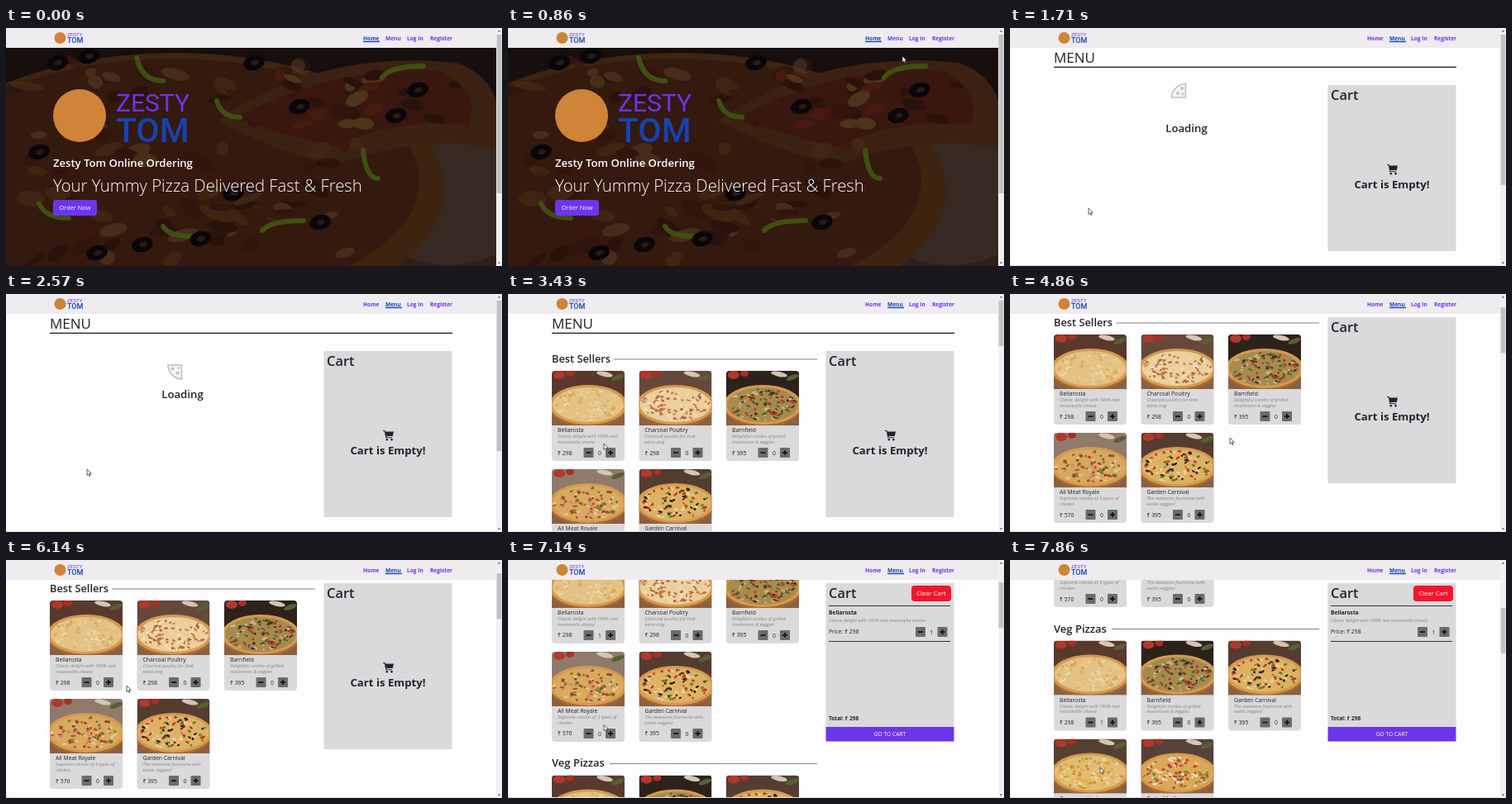
An HTML page for the animation above (8 s loop, 600 by 288 pixels).

```html
<!DOCTYPE html>
<html lang="en">
<head>
<meta charset="utf-8">
<title>Online ordering</title>
<style>
  html, body { margin: 0; width: 100%; height: 100%; overflow: hidden; background: #fdfcfe; }
  svg { display: block; width: 600px; height: 288px; font-family: "Open Sans", "Noto Sans", sans-serif; fill: #212529; }
  .brand { font-family: Roboto, "Open Sans", sans-serif; }
  .semi { font-weight: 600; }
  .bold { font-weight: 700; }
  .note { font-style: italic; fill: #858388; }
  .mid { text-anchor: middle; }
  .white { fill: #fff; }
</style>
</head>
<body>
<svg id="stage" viewBox="0 0 600 288"></svg>
<script>
const PURPLE = '#6c35ec', BLUE = '#1747b5', PANEL = '#dad9db';
const TICK = 1000 / 7, TICKS = 56;
const PAGE_OPENS = 9, MENU_LOADED = 20, ITEM_ADDED = 45;

let seed = 1;
function random() {
  seed = (seed * 16807) % 2147483647;
  return seed / 2147483647;
}
const between = (a, b) => a + (b - a) * random();
const pick = list => list[Math.floor(random() * list.length)];

const text = (x, y, size, str, cls = '', attrs = '') =>
  `<text x="${x}" y="${y}" font-size="${size}" class="${cls}" ${attrs}>${str}</text>`;
const rect = (x, y, w, h, fill, r = 0) =>
  `<rect x="${x}" y="${y}" width="${w}" height="${h}" rx="${r}" fill="${fill}"/>`;
const oval = (x, y, rx, ry, fill, angle = 0) =>
  `<ellipse cx="${x}" cy="${y}" rx="${rx}" ry="${ry}" fill="${fill}" transform="rotate(${angle} ${x} ${y})"/>`;
const group = (id, body, attrs = '') => `<g id="${id}" ${attrs}>${body}</g>`;
const repeat = (n, make) => Array.from({ length: n }, (_, i) => make(i)).join('');

// Dishes: name, two lines of description, price, backdrop, cheese, toppings
const dishes = {
  plain: ['Bellarosta', 'Classic delight with 100% real', 'mozzarella cheese', 298,
    '#59392c', '#e3c283', ['#edd7a5', '#d9ac62', '#e9cb8c']],
  smoky: ['Charcoal Poultry', 'Charcoal poultry for that', 'extra zing', 298,
    '#66483b', '#ebcf9c', ['#b5623a', '#c47747', '#f0dfba']],
  barn: ['Barnfield', 'Delightful combo of grilled', 'mushroom &amp; veggies', 395,
    '#2d211b', '#a98a4b', ['#c52f2b', '#4d6a22', '#665038', '#3b2f20', '#cdb694']],
  meat: ['All Meat Royale', 'Supreme combo of 3 types of', 'chicken', 570,
    '#907a6c', '#d9a95f', ['#b9422f', '#d98270', '#8c4a2c', '#66792d', '#e7c890']],
  garden: ['Garden Carnival', 'The awesome foursome with', 'exotic veggies!', 395,
    '#543c30', '#ddb265', ['#c93125', '#2b241f', '#64842d', '#ebcf91']],
  corn: ['Creamy n Husk', 'Sweet &amp; juicy golden', 'corn', 375,
    '#55402f', '#e2bd76', ['#e3aa2f', '#efd79e', '#c99336']],
  perky: ['Perky Medley', 'Flavorful trio of juicy', 'veggies', 395,
    '#564234', '#dba85a', ['#cb3a2b', '#f0dfc0', '#6d8a33']],
};

function dishPhoto([, , , , backdrop, cheese, toppings]) {
  const topping = () => {
    const r = Math.sqrt(random()), a = between(0, 2 * Math.PI);
    return oval(44 + 41 * r * Math.cos(a), 41 + 19 * r * Math.sin(a),
      between(1.3, 3), between(.8, 1.7), pick(toppings), between(-40, 40));
  };
  return rect(0, 0, 88, 66, backdrop) + rect(0, 52, 88, 14, '#896044') +
    oval(9, 5, 7, 5, '#b3372a') + oval(22, 3, 5, 4, '#a82f25') +
    oval(64, 4, 10, 3, '#d3c5b1', 12) + oval(80, 8, 8, 3, '#566034', -20) +
    oval(44, 43, 48, 25, '#a8672f') + oval(44, 41, 47, 24, '#d39b51') +
    oval(44, 41, 43, 21, cheese) + repeat(95, topping);
}

const stepper = (x, y, qty, cls = '') =>
  rect(x, y, 12, 12, '#6d6b6d', 1) + rect(x + 3, y + 5.2, 6, 1.7, '#111') +
  text(x + 19.5, y + 8.6, 6.8, qty, 'mid ' + cls) +
  rect(x + 26.5, y, 12, 12, '#6d6b6d', 1) + rect(x + 29.5, y + 5.2, 6, 1.7, '#111') +
  rect(x + 31.7, y + 3, 1.7, 6, '#111');

function card(key, column, y) {
  const [name, line1, line2, price] = dishes[key];
  return `<g transform="translate(${53 + 105.5 * column} ${y})">` + rect(0, 0, 88, 109, PANEL, 4) +
    `<use href="#photo-${key}"/>` + text(7, 74, 6.8, name) +
    text(7, 81.3, 5.6, line1, 'note') + text(7, 87.6, 5.6, line2, 'note') +
    text(7, 101.5, 6.8, '₹ ' + price) +
    stepper(38.5, 93, 0, key === 'plain' ? 'chosen-qty' : '') + '</g>';
}

const section = (title, lineX, y, size, rows) =>
  text(53, y, size, title, 'semi') + rect(lineX, y - 4.5, 374 - lineX, 1, '#858385') +
  rows.map((row, r) => row.map((key, c) => card(key, c, y + 10 + 119 * r)).join('')).join('');

function heroPhoto() {
  const pepper = (x, y, dx, dy) =>
    `<path d="M${x} ${y}q${dx * .2} ${dy} ${dx} ${dy}" fill="none" stroke="#4c6414" stroke-width="6" stroke-linecap="round"/>`;
  const olive = ([x, y]) => oval(x, y, 13, 9, '#0b090b', -15) + oval(x + 1, y, 5, 3, '#33201a', -15);
  const crumb = () => oval(between(10, 430), between(40, 285), between(6, 22), between(4, 10),
    pick(['#4b1d12', '#57351b', '#3b1a11', '#62432a', '#2e160f']), between(-40, 40));
  return rect(0, 24, 593, 264, '#1d1311') +
    oval(540, 205, 125, 105, '#35281f') + oval(535, 195, 112, 92, '#43342a') +
    oval(205, 195, 325, 165, '#4c2d15') + oval(200, 185, 300, 148, '#412012') +
    `<path d="M255 112Q380 25 545 42Q610 65 593 145Q500 128 400 165Q325 150 255 112Z" fill="#4a2a16"/>
     <path d="M275 110Q395 45 525 52Q575 75 560 118Q470 108 395 145Z" fill="#481d13"/>` +
    `<g opacity=".7">${repeat(90, crumb)}</g>` +
    repeat(22, () => oval(between(320, 560), between(55, 120), between(6, 16), between(4, 8),
      pick(['#572013', '#60401f', '#35170f']), between(-30, 30))) +
    pepper(158, 36, 32, 28) + pepper(255, 88, 28, 20) + pepper(455, 60, 50, -14) +
    pepper(432, 148, 18, 34) + pepper(310, 245, 50, -12) + pepper(190, 240, 34, 12) + pepper(40, 212, 36, 18) +
    [[62, 42], [100, 34], [300, 42], [355, 95], [472, 106], [498, 75], [275, 200],
     [380, 235], [235, 255], [165, 262], [40, 150], [110, 272]].map(olive).join('') +
    rect(0, 24, 593, 264, 'rgba(0,0,0,.2)');
}

const hero = heroPhoto() + oval(89, 106, 32, 32, '#cf8437') +
  text(133, 101, 30, 'ZESTY', 'brand', `style="fill:${PURPLE}"`) +
  text(133, 138, 41, 'TOM', 'brand', 'style="fill:#1642b0;font-weight:500"') +
  text(57, 168, 13.1, 'Zesty Tom Online Ordering', 'semi white') +
  text(57, 198, 20.3, 'Your Yummy Pizza Delivered Fast &amp; Fresh', 'white', 'font-weight="300"') +
  rect(57, 208, 53, 19, PURPLE, 3) + text(83.5, 220.3, 7.4, 'Order Now', 'mid white');

const loading =
  group('slice', `<path d="M212.5 84H195.5A17.5 17 0 0 1 212.5 67.5Z" fill="#f4f3f5" stroke="#c2c0c3" stroke-width="1.6"/>` +
    oval(208, 73, 2, 2, '#c2c0c3') + oval(203, 79, 2, 2, '#c2c0c3') + oval(209, 80, 1.4, 1.4, '#c2c0c3')) +
  text(213.5, 125.5, 13.2, 'Loading', 'semi mid');

const list =
  section('Best Sellers', 128, 83, 12.8, [['plain', 'smoky', 'barn'], ['meat', 'garden']]) +
  section('Veg Pizzas', 123, 351.5, 13, [['plain', 'barn', 'garden'], ['corn', 'perky']]);

const emptyCart = rect(0, 0, 155, 201, PANEL) +
  `<path transform="translate(71.5 96)" d="M0 0h2.6l.4 1.5H13l-1.2 5.4H4.2l.3 1.3h6.8v1.1H3.4L1.8 1.1H0z"/>` +
  oval(76.3, 107.2, 1.3, 1.3, '#212529') + oval(82, 107.2, 1.3, 1.3, '#212529') +
  text(77.5, 125, 13.2, 'Cart is Empty!', 'bold mid');

const filledCart = rect(0, 0, 155, 175, PANEL) +
  rect(103.5, 3, 48, 19, '#f3152d', 4) + text(127.5, 15.4, 7.7, 'Clear Cart', 'mid white') +
  rect(3.5, 27, 147, 1, '#333') + text(3.5, 38.3, 6.7, dishes.plain[0], 'bold') +
  text(3.5, 47, 5.5, dishes.plain[1] + ' ' + dishes.plain[2], 'note') +
  text(3.5, 61.4, 6.8, 'Price: ₹ 298') + stepper(108.5, 53, 1) +
  rect(3.5, 70, 147, 1, '#333') + text(3.5, 165.8, 6.5, 'Total: ₹ 298', 'bold') +
  rect(0, 174, 155, 17.5, PURPLE) + text(77.5, 185.3, 6.7, 'GO TO CART', 'mid white');

const navLink = (label, x) => text(x, 14.5, 6.6, label, 'bold', `id="link-${label}" style="fill:${PURPLE}"`);
const nav = rect(0, 0, 593, 24, '#eeecef') + oval(65.5, 12, 7, 7, '#cf8437') +
  text(74, 10.3, 6.2, 'ZESTY', 'brand', `style="fill:${PURPLE}"`) +
  text(74, 18.4, 9, 'TOM', 'brand', 'style="fill:#1642b0;font-weight:500"') +
  navLink('Home', 432) + navLink('Menu', 459) + navLink('Log In', 485) + navLink('Register', 513) +
  `<rect id="underline" y="15.8" width="20" height="1.4" fill="${BLUE}"/>`;

const scrollbar = rect(593, 0, 7, 288, '#f1f0f2') +
  '<path d="M594.8 4.5l1.7-2 1.7 2zM594.8 283.5l1.7 2 1.7-2z" fill="#555"/>' +
  '<rect id="thumb" x="593.7" width="5.6" fill="#c2c1c3"/>';

const photos = Object.entries(dishes).map(([key, dish]) =>
  `<g id="photo-${key}" clip-path="url(#frame)">${dishPhoto(dish)}</g>`).join('');

const $ = id => document.getElementById(id);
$('stage').innerHTML =
  `<defs><clipPath id="frame"><path d="M0 66V4Q0 0 4 0H84Q88 0 88 4V66Z"/></clipPath>${photos}</defs>` +
  rect(0, 0, 600, 288, '#fdfcfe') + group('hero', hero) +
  group('menu',
    group('page', text(53, 42, 17, 'MENU') + rect(53, 46.7, 487, 1.4, '#212529') +
      group('loading', loading) + group('list', list)) +
    group('cart', group('empty', emptyCart) + group('filled', filledCart) + text(3.5, 17.5, 16.4, 'Cart', 'semi')) +
    rect(0, 287, 593, 1, '#dddbde')) +
  nav + scrollbar +
  group('cursor', '<path d="M0 0V7.4L1.7 5.9 2.9 8.5 4 8 2.9 5.4H5.2Z" fill="#fff" stroke="#222" stroke-width=".7"/>');

// Keyframes: [tick, ...values], eased from each to the next
const pointerKeys = [[3, 505, 92], [6, 477, 34], [8, 469, 13], [9, 468, 13], [12, 95, 218], [18, 98, 212],
  [24, 116, 181], [26, 122, 180], [32, 266, 174], [35, 266, 174], [43, 146, 152], [45, 124, 147],
  [48, 123, 148], [52, 109, 251], [56, 109, 251]];
const scrollKeys = [[31, 0], [33, 44], [48, 44], [54, 264]];

function track(keys, tick) {
  const next = keys.findIndex(key => key[0] > tick);
  if (next === 0) return keys[0].slice(1);
  if (next < 0) return keys[keys.length - 1].slice(1);
  const a = keys[next - 1], b = keys[next];
  const p = (tick - a[0]) / (b[0] - a[0]), eased = p * p * (3 - 2 * p);
  return a.slice(1).map((value, i) => value + (b[i + 1] - value) * eased);
}

const show = (id, visible) => { $(id).style.display = visible ? '' : 'none'; };
const move = (id, x, y) => $(id).setAttribute('transform', `translate(${x} ${y})`);

function draw(tick) {
  const onMenu = tick >= PAGE_OPENS, loaded = tick >= MENU_LOADED, added = tick >= ITEM_ADDED;
  const [scroll] = track(scrollKeys, tick);

  show('hero', !onMenu);
  show('menu', onMenu);
  show('loading', !loaded);
  show('list', loaded);
  show('empty', !added);
  show('filled', added);
  show('cursor', tick >= 3);

  move('page', 0, -scroll);
  move('cart', 384.5, Math.max(28, 69 - scroll));
  move('cursor', ...track(pointerKeys, tick));
  $('slice').setAttribute('transform', `rotate(${90 * Math.floor((tick - 12) / 2)} 213.5 85)`);
  document.querySelectorAll('.chosen-qty').forEach(el => { el.textContent = added ? 1 : 0; });

  $('link-Home').style.fill = onMenu ? PURPLE : BLUE;
  $('link-Menu').style.fill = onMenu ? BLUE : PURPLE;
  $('underline').setAttribute('x', onMenu ? 459 : 432);
  $('thumb').setAttribute('y', 8 + scroll * .19);
  $('thumb').setAttribute('height', loaded ? 55 : onMenu ? 182 : 192);
}

let start, lastTick = -1;
function frame(now) {
  start ??= now;
  const tick = Math.floor((now - start + 5) / TICK) % TICKS;
  if (tick !== lastTick) draw(lastTick = tick);
  requestAnimationFrame(frame);
}
draw(0);
requestAnimationFrame(frame);
</script>
</body>
</html>
```
